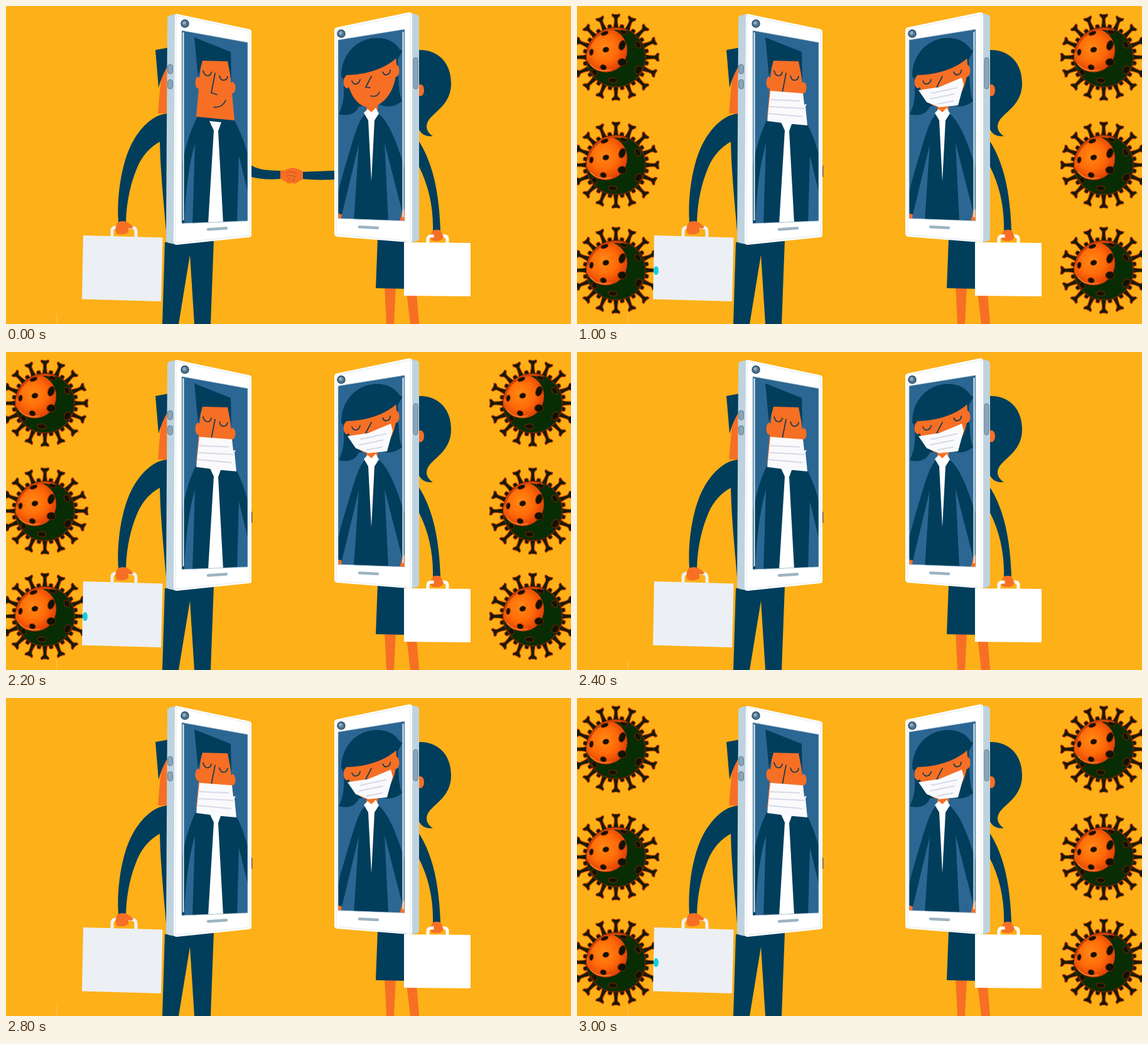
An HTML page for the animation above (3200 ms loop, 900x506 px).

```html
<!DOCTYPE html>
<html lang="en">
<head>
<meta charset="utf-8">
<title>Remote handshake</title>
<style>
html, body { margin: 0; width: 100%; height: 100%; overflow: hidden; background: #fdb018; }
svg { display: block; width: 100vw; height: 100vh; }
.navy { fill: #003e5c; }
.skin { fill: #f66f25; }
.blue { fill: #2c6693; }
.white { fill: #fff; }
.side { fill: #bfd3df; }
.line { fill: none; stroke: #143a50; stroke-width: 1.7; stroke-linecap: round; }
.fold { fill: none; stroke: #d6dae6; stroke-width: 2.2; }
.grip { fill: none; stroke-width: 5; stroke-linejoin: round; }
.edge { fill: none; stroke: #d7e4ec; stroke-width: .8; }
.button { fill: #8ba5b8; stroke: #5e8098; stroke-width: 1; }
</style>
</head>
<body>
<svg viewBox="0 0 900 506" preserveAspectRatio="none">
  <defs>
    <radialGradient id="glow" cx=".45" cy=".45" r=".58">
      <stop offset="0" stop-color="#ff8a14"/>
      <stop offset=".55" stop-color="#ff6a08"/>
      <stop offset="1" stop-color="#dc3c05"/>
    </radialGradient>
    <clipPath id="ball"><circle r="47"/></clipPath>
    <clipPath id="screenL"><path d="M280 39L385 58V342L280 346Z"/></clipPath>
    <clipPath id="screenR"><path d="M529 54L635 37V342L529 338Z"/></clipPath>
    <g id="virus"></g>
  </defs>

  <rect width="900" height="506" fill="#fdb018"/>
  <path d="M81 490V506" stroke="#ffd071" stroke-width=".8"/>
  <g id="swarm"></g>

  <!-- man behind the phone -->
  <path class="skin" d="M258 90L247 112L242 171H260V90Z"/>
  <path class="navy" d="M238 70L260 66V92Q249 108 243 130Z"/>
  <path class="navy" d="M260 171C237 171 217 190 203 214C184 247 176 303 179 344H191C192 309 199 281 209 257C217 238 230 224 245 216C246 268 252 320 256 370H262Z"/>
  <path class="navy" d="M253 376L249 506H275L293 396L300 506H326L331 372Z"/>
  <path class="grip" stroke="#eef1f5" d="M169 367V358Q169 352 176 352H201Q207 353 207 359V369"/>
  <path class="skin" d="M178 344Q188 340 195 345L203 351Q200 356 195 353L195 360Q186 366 176 362Q172 354 178 344Z"/>
  <path d="M123 365L249.500 368.500L247 470L121 466.500Z" fill="#ecf0f4"/>

  <!-- woman behind the phone -->
  <path class="navy" d="M655 70C689 68 709 91 709 123C709 151 691 163 679 175C665 188 669 200 680 207C667 209 659 202 655 190Z"/>
  <ellipse class="skin" cx="660" cy="134" rx="6" ry="9.500"/>
  <path class="navy" d="M655 211C681 249 690 300 692 357H680C681 320 673 283 655 250Z"/>
  <path class="skin" d="M603 445H621L618 506H606ZM638 455H654L658 506H644Z"/>
  <path class="navy" d="M592 370L636 374V450L589 449Z"/>
  <path class="skin" d="M680 357Q687 355 692 357L697 367Q694 375 685 374Q676 375 675 366Z"/>
  <path class="grip" stroke="#fff" d="M672 379V371Q672 366 678 366H698Q703 366 703 371V379"/>
  <path class="skin" d="M681 358H692L697 367Q696 372 690 373H682Z"/>
  <path class="white" d="M634 376L740 377V462L634 461Z"/>

  <!-- handshake -->
  <g id="shake">
    <path class="navy" d="M390 253C402 261 420 262 438 262V275C418 277 404 275 390 272ZM524 262L471 264V275C489 277 508 277 524 276Z"/>
    <path class="skin" d="M437 262L445 261Q455 255 464 259L473 263V276L466 279Q461 285 455 281Q450 285 445 279L437 275Z"/>
    <path d="M446 266Q455 261 463 267M446 271L453 269L462 272M450 277L453 273M457 279L459 274" fill="none" stroke="#c9501a" stroke-width="1.100"/>
  </g>
  <path id="stub" d="M391.500 254V272" stroke="#5b4b38" stroke-width="1.500"/>

  <!-- left phone -->
  <path class="side" d="M257 20Q257 16 261 15L273 12V380L259 377Q255 376 255 372Z"/>
  <path class="white" d="M269 17Q269 12 274 13L388 37Q391 38 391 42V364Q391 368 387 368L272 380Q267 380 267 374Z"/>
  <path class="edge" d="M271 15L388 40V365L270 377Z"/>
  <path class="blue" d="M280 39L385 58V342L280 346Z"/>
  <g clip-path="url(#screenL)">
    <path class="navy" d="M305 176L364 182C375 203 381 220 386 240V300L371 238L368 348H297L301 219C292 250 286 290 284 348H279V260C285 225 293 199 305 176Z"/>
    <path class="white" d="M324 183L343 185L338 199L346 346H322L331 198Z"/>
    <ellipse class="skin" cx="306" cy="122" rx="4.500" ry="9.500"/>
    <ellipse class="skin" cx="361" cy="130" rx="4.500" ry="9"/>
    <path class="skin" d="M311 86H355L364 182L303 176Z"/>
    <path class="navy" d="M300 50L358 73L359 119L353 88L313 87L306 113Z"/>
    <path class="line" d="M314 103Q316 111 321 111Q326 111 327 105M340 111Q342 119 347 118Q352 118 353 112M333 107L327 138L336 141M331 161Q345 162 350 150"/>
  </g>
  <path d="M282.500 42V341" stroke="#eaf3f8" stroke-width="2"/>
  <path d="M280 39V346L385 342V58Z" fill="none" stroke="#a7c0d0" stroke-width=".8"/>
  <rect class="button" x="257.500" y="93" width="8" height="15" rx="4"/>
  <rect class="button" x="257.500" y="117" width="8" height="15" rx="4"/>
  <path d="M322 355.500L351 353.500" stroke="#9db4c3" stroke-width="4.500" stroke-linecap="round"/>
  <circle cx="285" cy="28" r="6" fill="#52748c" stroke="#294f6b" stroke-width="1.500"/>
  <circle cx="284" cy="27" r="2.700" fill="#91aabd"/>

  <!-- right phone -->
  <path class="side" d="M642 10L655 14Q658 15 658 19V369Q658 373 654 374L642 377Z"/>
  <path class="white" d="M523 39Q523 35 527 34L642 10Q647 10 647 16V372Q647 377 641 376L527 367Q523 366 523 362Z"/>
  <path class="edge" d="M526 37L644 13V374L526 364Z"/>
  <path class="blue" d="M529 54L635 37V342L529 338Z"/>
  <g clip-path="url(#screenR)">
    <path class="navy" d="M534 112C534 76 560 51 591 51C611 51 622 61 627 69L631 72L624 85C626 110 624 136 631 151C621 160 607 163 594 156L562 160C557 172 545 176 530 172C540 153 539 132 537 116Z"/>
    <path class="navy" d="M572 172C562 181 556 203 548 229C540 256 532 281 528 302V330L535 332L562 220L554 342H609L603 218L632 331L637 326V264C626 229 613 187 594 172Z"/>
    <path class="skin" d="M529 330L535 332L533 342H527ZM632 325L637 321V343H627Z"/>
    <path class="skin" d="M575 156H592V165L582 174L574 166Z"/>
    <ellipse class="skin" cx="543" cy="121" rx="5.500" ry="10"/>
    <ellipse class="skin" cx="621" cy="103" rx="5.500" ry="10"/>
    <path class="skin" d="M541 106L621 82C626 115 614 151 586 160C564 166 546 145 541 106Z"/>
    <path class="navy" d="M535 110C534 76 560 51 591 51C611 51 622 61 627 69L631 71C619 93 582 111 535 110Z"/>
    <path class="white" d="M570 170L576 164L582 169L589 162L594 171L587 182L582 279L577 182Z"/>
    <path class="line" d="M551 119Q553 125 558 124Q563 123 564 117M600 105Q603 111 607 109Q612 108 612 102M582 112L573 129L580 130M581 143Q591 146 595 137"/>
  </g>
  <path d="M632.500 41V336" stroke="#eaf3f8" stroke-width="2"/>
  <path d="M529 54L635 37V342L529 338Z" fill="none" stroke="#a7c0d0" stroke-width=".8"/>
  <rect class="button" x="649" y="82" width="7" height="50" rx="3.500"/>
  <path d="M563 351.500L592 353" stroke="#9db4c3" stroke-width="4.500" stroke-linecap="round"/>
  <circle cx="534" cy="44" r="6" fill="#52748c" stroke="#294f6b" stroke-width="1.500"/>
  <circle cx="533" cy="43" r="2.700" fill="#91aabd"/>

  <g id="masks">
    <path fill="#fafafd" d="M308 135L360 139L362 157L366 156L364 160L367 190L334 187L303 183Z"/>
    <path class="fold" d="M306 149L355 151M305 160L362 163M304 171L359 176"/>
    <path fill="#fafafd" d="M544 134L577 129L613 114L616 125L607 158L577 161L557 153Z"/>
    <path class="fold" d="M564 139L606 130M562 148L601 140M574 156L600 151"/>
  </g>
  <ellipse id="speck" cx="126" cy="421" rx="4" ry="7" fill="#12cfe0"/>
</svg>
<script>
const $ = id => document.getElementById(id);

// trumpet-shaped spike: broad foot, narrow neck, flared rounded head
const spike = (angle, tip, head) =>
  `<path transform="rotate(${angle})" d="M-5.500 -44Q-2.500 -50 -2.500 ${8 - tip}
    Q-3.500 ${5 - tip} ${-head} ${4 - tip}Q${-head - 1.5} ${-tip} ${1 - head} ${-tip}
    Q0 ${2 - tip} ${head - 1} ${-tip}Q${head + 1.5} ${-tip} ${head} ${4 - tip}
    Q3.500 ${5 - tip} 2.500 ${8 - tip}Q2.500 -50 5.500 -44Z"/>`;

// x, y, rx, ry, tilt of the knobs on the body
const knobs = [
  [-16, -12, 5, 4, -20], [10, -19, 5, 8, 20], [10, 8, 7, 6, 0], [-20, 16, 5, 4, 20],
  [-39, -8, 3, 5, 10], [-18, -38, 6, 3, -20], [12, -40, 6, 3, 15], [35, -20, 4, 6, -30],
  [-5, 37, 7, 4, 5], [36, 20, 5, 7, 30], [-34, 24, 4, 5, -30]
];

function buildVirus() {
  let spikes = '', stubs = '';
  for (let i = 0; i < 16; i++) {
    spikes += spike(i * 22.5, 69, 6);
    stubs += `<path transform="rotate(${i * 22.5 + 11})" d="M-4 -44L-3 -52Q0 -54 3 -52L4 -44Z"/>`;
  }
  const dots = knobs.map(([x, y, rx, ry, tilt]) =>
    `<ellipse rx="${rx}" ry="${ry}" transform="translate(${x} ${y}) rotate(${tilt})"/>`).join('');
  $('virus').innerHTML =
    `<g fill="#141c05" stroke="#c83c0a" stroke-width="1.200">${stubs}${spikes}</g>
     <circle r="47" fill="#082c03" stroke="#6e2406" stroke-width="1.500"/>
     <g clip-path="url(#ball)">
       <ellipse cx="-16" cy="-11" rx="34" ry="35" fill="url(#glow)"/>
       <path d="M-45 -8A45 45 0 0 1 16 -42" fill="none" stroke="#d24206" stroke-width="4"/>
       <path d="M-41 11Q-30 25 -8 20" fill="none" stroke="#ff9a40" stroke-width="1.200"/>
       <g fill="#121203" stroke="#7c2606" stroke-width="1">${dots}</g>
     </g>`;
  $('swarm').innerHTML = [62, 839].flatMap(x =>
    [81.5, 253, 420.5].map(y => `<use href="#virus" x="${x}" y="${y}"/>`)).join('');
}

const show = (id, on) => $(id).setAttribute('visibility', on ? 'visible' : 'hidden');

function draw(ms) {
  const t = ms % 3200;
  const masked = t >= 1000;
  const infected = masked && (t < 2000 || Math.floor((t - 2000) / 200) % 2 === 1);
  show('shake', !masked);
  show('stub', masked);
  show('masks', masked);
  show('swarm', infected);
  show('speck', infected);
}

buildVirus();
const start = performance.now();
function tick() {
  draw(performance.now() - start);
  requestAnimationFrame(tick);
}
tick();
</script>
</body>
</html>
```
